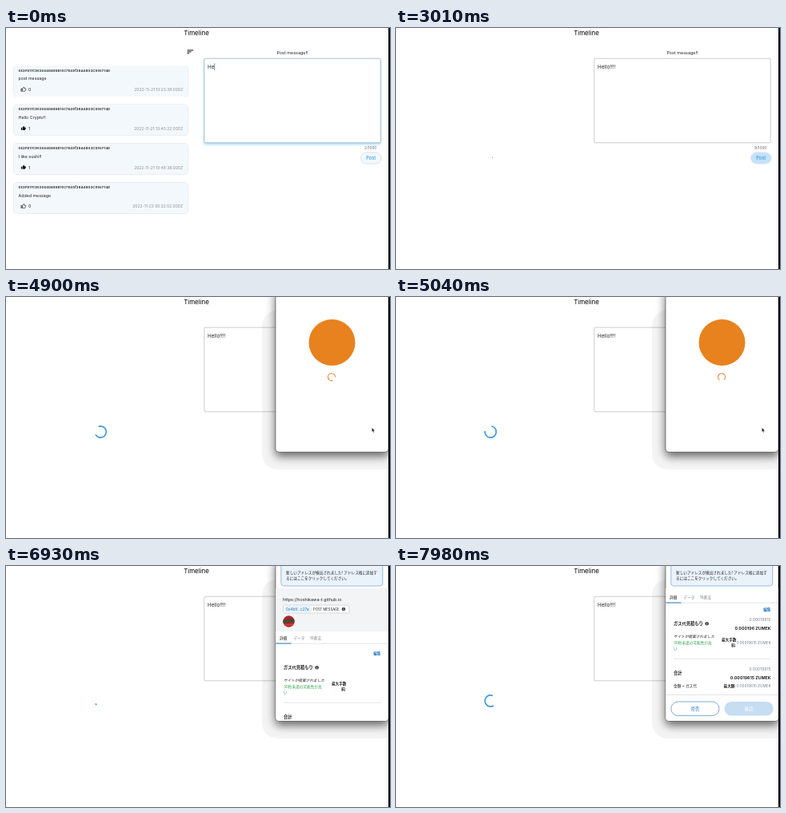
An HTML page that plays this animation: 480x302 px, repeating every 8000 ms.

```html
<!DOCTYPE html>
<html lang="ja">
<head>
<meta charset="utf-8">
<title>Timeline</title>
<style>
html, body { margin: 0; width: 100%; height: 100%; overflow: hidden; background: #fff; }
svg { display: block; width: 480px; height: 302px; }
text { font: 5.3px Inter, "Noto Sans CJK JP", "Noto Sans CJK", sans-serif; dominant-baseline: central; fill: #222; white-space: pre; }
.mid { text-anchor: middle; }
.end { text-anchor: end; }
.title { font-size: 7.9px; fill: #000; }
.addr { font-size: 3.9px; font-weight: 700; letter-spacing: .33px; }
.date { font-size: 4.95px; fill: #8b8f93; text-anchor: end; }
.card { fill: #f3f8fd; filter: drop-shadow(0 .6px .6px rgba(30, 60, 90, .28)); }
#field { fill: #fff; stroke: #bfbfbf; stroke-width: .8; }
#field.focus { stroke: #9fb0bb; filter: drop-shadow(0 2px 1.5px rgba(110, 200, 250, .6)); }
#typed { font-size: 6.3px; }
#count { font-size: 4.65px; fill: #666; }
#pill { fill: #f1f8fe; filter: drop-shadow(0 .7px .8px rgba(30, 60, 90, .35)); }
#press { fill: #2196f3; }
.post { font-weight: 500; font-size: 5.5px; fill: #2f95da; }
.window { fill: #fff; stroke: #444; stroke-width: .6; filter: drop-shadow(0 5px 6px rgba(0, 0, 0, .6)); }
.ring { fill: none; }
.s text, text.s { font-size: 4.65px; }
.m { font-size: 5.25px; }
.b { font-weight: 700; }
#popup .blue { fill: #1f72b8; }
#popup .grey { fill: #7a8087; }
.rule { stroke: #cfd3d7; stroke-width: .6; }
.info circle { fill: #3a3f45; }
.info path { stroke: #fff; stroke-width: .7; }
</style>
</head>
<body>
<svg viewBox="0 0 480 302">
  <defs>
    <path id="thumb" d="M1 21h4V9H1v12zm22-11c0-1.1-.9-2-2-2h-6.31l.95-4.57.03-.32c0-.41-.17-.79-.44-1.06L14.17 1 7.59 7.59C7.22 7.95 7 8.45 7 9v10c0 1.1.9 2 2 2h9c.83 0 1.54-.5 1.84-1.22l3.02-7.05c.09-.23.14-.47.14-.73v-2z"/>
    <g id="info" class="info"><circle r="2.3"/><path d="M0-1.4v.7M0-.3v1.7"/></g>
    <clipPath id="listClip"><rect y="47.5" width="240" height="250"/></clipPath>
    <clipPath id="winClip"><path d="M337.3-10h140.4V190a4 4 0 0 1-4 4H341.300a4 4 0 0 1-4-4z"/></clipPath>
    <clipPath id="scrollClip"><rect x="337" y="28" width="141" height="166"/></clipPath>
    <clipPath id="faceClip"><circle cx="353.5" cy="69.500" r="7.2"/></clipPath>
  </defs>

  <text class="title mid" x="238" y="6">Timeline</text>

  <g id="list">
    <path d="M226.500 27.900h7.600M226.500 29.900h5.100M226.500 31.900h2.600" stroke="#111" stroke-width="1"/>
    <g id="cards" clip-path="url(#listClip)"></g>
  </g>
  <circle id="spin" class="ring" cx="118.200" cy="169" r="7.1" pathLength="360" stroke="#3d97de" stroke-width="1.6"/>

  <text class="mid" x="358" y="30.500" style="font-size:5.45px">Post message!!</text>
  <rect id="field" x="247.800" y="38.200" width="220.400" height="105.600" rx="1"/>
  <text id="typed" x="252" y="48.500"></text>
  <rect id="caret" y="44.300" width=".8" height="8.600" fill="#2b86c9"/>
  <text id="count" class="end" x="463.300" y="150.200"></text>
  <rect id="pill" x="444" y="156.500" width="24.600" height="13" rx="6.500"/>
  <rect id="press" x="444" y="156.500" width="24.600" height="13" rx="6.500"/>
  <text class="post mid" x="456.200" y="163">Post</text>

  <g id="popup">
    <rect x="320" y="17" width="170" height="199" rx="19" fill="#000" opacity=".045"/>
    <rect class="window" x="337" y="-10" width="141" height="204.300" rx="4"/>

    <g id="loading">
      <circle cx="407.500" cy="57" r="29" fill="#e8821e"/>
      <circle id="wait" class="ring" cx="407" cy="100.300" r="4.500" pathLength="360" stroke="#e39042" stroke-width="1.200" stroke-dasharray="290 70"/>
    </g>

    <g id="confirm" clip-path="url(#winClip)">
      <rect x="343.800" y="-12" width="127" height="37" rx="3.500" fill="#eaf2fa" stroke="#6fa3d2" stroke-width=".7"/>
      <g class="s">
        <text x="350" y="8.300">新しいアドレスが検出されました! アドレス帳に追加す</text>
        <text x="350" y="15.200">るにはここをクリックしてください。</text>
      </g>
      <g clip-path="url(#scrollClip)">
        <rect x="337" y="28" width="141" height="54" fill="#f3f4f5"/>
        <g id="body">
          <rect x="337" y="82" width="141" height="180" fill="#fff"/>
          <text x="346" y="42" style="font-size:5.4px">https://hoshikawa-t.github.io</text>
          <rect x="346.500" y="49" width="82.500" height="10" rx="2" fill="#fff" stroke="#bcc2c8" stroke-width=".6"/>
          <path d="M348.500 49.300H381.500V58.700H348.500z" fill="#e9f2fa"/>
          <text class="s blue" x="350" y="54">0x4b9...c27a</text>
          <text x="381.700" y="54" style="font-size:4.2px">: POST MESSAGE</text>
          <use href="#info" x="422" y="54"/>
          <g clip-path="url(#faceClip)">
            <rect x="346" y="62" width="15" height="15" fill="#a8232f"/>
            <path d="M346 67.500l15-1.500v4l-15 2z" fill="#4b4a2c"/>
            <path d="M346 73l15-1v2l-15 1.500z" fill="#d33a3a"/>
          </g>

          <text class="s blue end b" x="468.500" y="109.200">編集</text>
          <text class="m b" x="347" y="127.300">ガス代見積もり</text>
          <use href="#info" x="388.600" y="127.300"/>
          <g class="s">
            <text x="347" y="143.300" font-style="italic" style="font-style:italic">サイトが提案されました</text>
            <text x="347" y="151.300" style="fill:#2fa04a">30秒未満の可能性が高</text>
            <text x="347" y="158" style="fill:#2fa04a">い</text>
            <text class="b end" x="425.500" y="147.300">最大手数</text>
            <text class="b end" x="425.500" y="154">料:</text>
            <text x="347" y="205.200">金額 + ガス代</text>
            <text class="b end" x="425" y="205.200">最大額:</text>
          </g>
          <path class="rule" d="M347 171.300H468.500M337 216.500H478"/>
          <text class="m b" x="347" y="189.300">合計</text>
          <g id="sums" class="end">
            <text class="m grey" x="468.500" y="122" style="font-size:5px">0.00019615</text>
            <text class="m b" x="468.500" y="133.200">0.000196 ZUMEK</text>
            <text class="s grey" x="468.500" y="150.800">0.00019615 ZUMEK</text>
            <text class="m grey" x="468.500" y="184.200" style="font-size:5px">0.00019615</text>
            <text class="m b" x="468.500" y="195.300">0.00019615 ZUMEK</text>
            <text class="s grey" x="468.500" y="205.200">0.00019615 ZUMEK</text>
          </g>
          <rect x="343.800" y="225" width="60.200" height="17.600" rx="8.800" fill="#fff" stroke="#5f98c8" stroke-width=".8"/>
          <text class="m mid blue" x="374" y="233.800">拒否</text>
          <rect x="410.500" y="225" width="61.200" height="17.600" rx="8.800" fill="#c6ddf2"/>
          <text class="m mid" x="441" y="233.800" style="fill:#fff">確認</text>
        </g>
        <g id="tabs" class="s">
          <rect x="337" y="82" width="141" height="15.500" fill="#fff"/>
          <path class="rule" d="M337 97.200H478"/>
          <path d="M337 97H356.500" stroke="#2b7cc2" stroke-width="1"/>
          <text x="342" y="89.500">詳細</text>
          <text class="grey" x="359.500" y="89.500">データ</text>
          <text class="grey" x="379.800" y="89.500">16進法</text>
        </g>
      </g>
    </g>
  </g>

  <rect x="478" width="2" height="302" fill="#000"/>
  <path id="hand" d="M456.300 164.500q.9-.6 1.300.4l.5 2.200 2.300.4q1.200.3 1 1.500l-.5 2.400h-3.500l-2.100-2.800q.2-1 1.500-.2z" fill="#fff" stroke="#222" stroke-width=".6"/>
  <path id="arrow" d="M457.400 163.800v5.300l1.200-1.100.8 1.900.8-.3-.8-1.900h1.700z" fill="#111" stroke="#fff" stroke-width=".3"/>
</svg>

<script>
const LOOP = 8000, STEP = 70;
const ADDRESS = '0x3Fb17c902e64Da85B10c7E49f28A6d03C95e714b';
const MESSAGE = 'Hello!!!!';
const KEYS = [280, 560, 840, 1680, 1960, 2170, 2380];  // third character onwards
const BLINK = 525, PRESS = 2800, SEND = 2940, HAND = 3990, OPEN = 4700, READY = 5530, SUMS = 7070;
const $ = id => document.getElementById(id);

const posts = [
  ['post message', 0, '2022-11-21 13:23:38.000Z'],
  ['Hello Crypto!!', 1, '2022-11-21 13:40:22.000Z'],
  ['I like sushi!!', 1, '2022-11-21 13:48:38.000Z'],
  ['Added message', 0, '2022-11-22 00:22:52.000Z']
];
$('cards').innerHTML = posts.map(([text, likes, date], i) => `
  <g transform="translate(0 ${47 + i * 48.8})">
    <rect class="card" x="9.500" width="218" height="39" rx="4"/>
    <text class="addr" x="15.500" y="6">${ADDRESS}</text>
    <text x="15.500" y="16.300">${text}</text>
    <use href="#thumb" transform="translate(18.600 26.600) scale(.27)"
      ${likes ? 'fill="#111"' : 'fill="none" stroke="#111" stroke-width="2.200"'}/>
    <text x="28" y="30">${likes}</text>
    <text class="date" x="221" y="30">${date}</text>
  </g>`).join('');

const clamp = x => Math.min(1, Math.max(0, x));
const show = (id, on) => $(id).setAttribute('visibility', on ? 'inherit' : 'hidden');
const turn = (id, deg) => {
  const c = $(id);
  c.setAttribute('transform', `rotate(${deg} ${c.getAttribute('cx')} ${c.getAttribute('cy')})`);
};

// cubic-bezier(.4, 0, .2, 1)
function ease(x) {
  let lo = 0, hi = 1;
  for (let i = 0; i < 20; i++) {
    const u = (lo + hi) / 2, v = 1 - u;
    if (1.2 * v * v * u + 0.6 * v * u * u + u * u * u < x) lo = u; else hi = u;
  }
  return lo * lo * (3 - 2 * lo);
}

function drawSpinner(age) {
  const phase = age / 1400 % 1;
  const head = 270 * ease(clamp(phase * 2));
  const tail = 270 * ease(clamp(phase * 2 - 1));
  const sweep = Math.max(head - tail, 1);
  $('spin').setAttribute('stroke-dasharray', `${sweep} ${360 - sweep}`);
  turn('spin', tail + phase * 90 + age / 2333 * 360 - 90);
}

function drawForm(t) {
  const typed = KEYS.filter(k => t >= k);
  const text = MESSAGE.slice(0, 2 + typed.length);
  const focus = t < PRESS;
  $('typed').textContent = text;
  $('count').textContent = text.length + '/1000';
  $('caret').setAttribute('x', 252 + $('typed').getComputedTextLength());
  show('caret', focus && Math.floor((t - (typed.pop() || 0)) / BLINK) % 2 === 0);
  $('field').classList.toggle('focus', focus);
  $('press').setAttribute('opacity', focus ? 0 : 0.22 - 0.1 * clamp((t - 3010) / 400));
}

function drawPopup(t) {
  const scroll = 55 * ease(clamp((t - 7140) / 350));
  show('popup', t >= OPEN);
  show('loading', t < READY);
  show('confirm', t >= READY);
  show('sums', t >= SUMS);
  turn('wait', (t - OPEN) * 0.36);
  $('body').setAttribute('transform', `translate(0 ${-scroll})`);
  $('tabs').setAttribute('transform', `translate(0 ${-Math.min(scroll, 51)})`);
}

function draw(now) {
  const time = now % LOOP, t = time - time % STEP;
  show('list', t < SEND);
  show('spin', t >= SEND);
  drawSpinner(Math.max(0, t - SEND));
  drawForm(t);
  drawPopup(t);
  show('hand', t >= HAND && t < OPEN);
  show('arrow', t >= OPEN && t < READY);
}

const start = performance.now();
function tick() {
  draw(performance.now() - start);
  requestAnimationFrame(tick);
}
tick();
</script>
</body>
</html>
```
